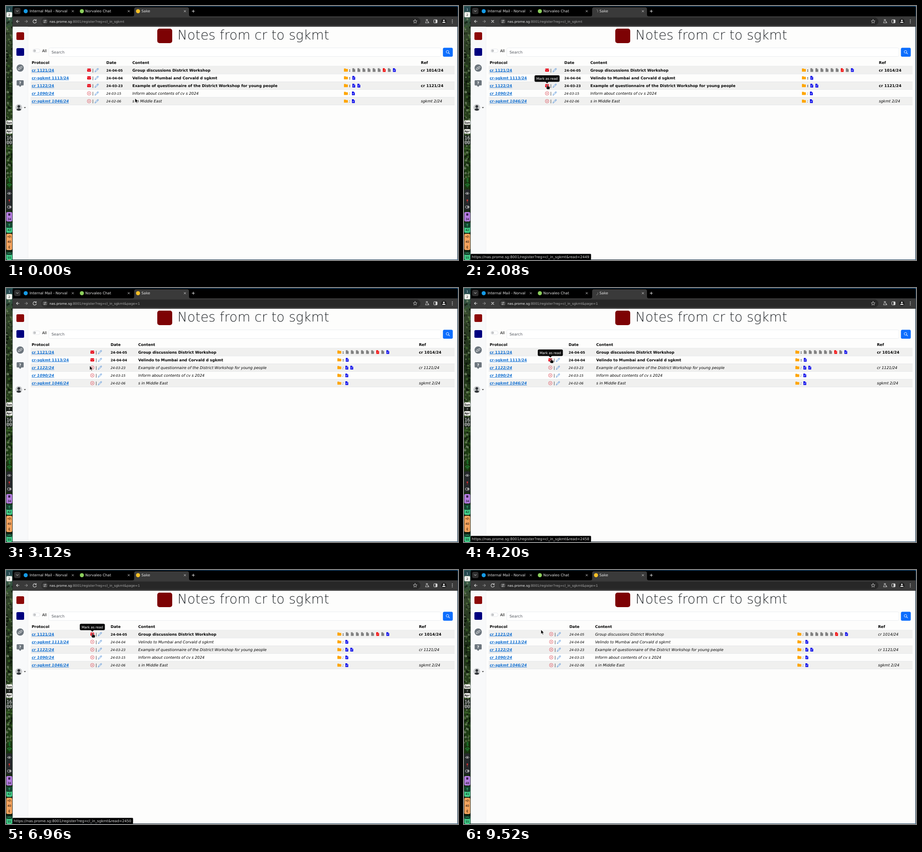
Write an HTML page that moves like this. It is 998x561 px and loops after 9.56 s.

```html
<!DOCTYPE html>
<html lang="en">
<head>
<meta charset="utf-8">
<title>Register</title>
<style>
  html, body { margin: 0; width: 100%; height: 100%; overflow: hidden; background: #000; }
  svg { display: block; width: 100%; height: 100%; }
  text { font-family: "DejaVu Sans", sans-serif; font-size: 8.32px; text-rendering: geometricPrecision; white-space: pre; }
  .b { font-weight: 700; }
  .i { font-style: italic; }
  .link { font-weight: 700; fill: #1471d2; text-decoration: underline; }
  .date { font-size: 7.28px; }
  .tab { font-size: 8px; fill: #e6e6e6; }
  .url { font-size: 7.28px; fill: #a8a8a8; }
  .bar { font-size: 6.4px; text-anchor: middle; }
  .mono { font-family: "DejaVu Sans Mono", monospace; }
  .clock { font-size: 10.5px; fill: #fff; }
</style>
</head>
<body>
<svg viewBox="0 0 998 561" preserveAspectRatio="none">
  <defs>
    <linearGradient id="forest" x1="0" y1="0" x2="0" y2="1">
      <stop offset="0" stop-color="#35635c"/><stop offset=".1" stop-color="#33452a"/>
      <stop offset=".3" stop-color="#1b2d16"/><stop offset=".45" stop-color="#28401c"/>
      <stop offset=".65" stop-color="#1c3a12"/><stop offset="1" stop-color="#0c170b"/>
    </linearGradient>
    <linearGradient id="sky">
      <stop offset="0" stop-color="#1d4a52"/><stop offset=".3" stop-color="#12304a"/>
      <stop offset=".5" stop-color="#1a5a92"/><stop offset="1" stop-color="#1d64a0"/>
    </linearGradient>
    <clipPath id="strip"><rect width="14.5" height="561"/></clipPath>
  </defs>
  <g id="backdrop"></g>
  <g id="live"></g>
</svg>
<script>
const LOOP = 9560;
const $ = id => document.getElementById(id);
const clamp = v => Math.max(0, Math.min(1, v));

const rect = (x, y, w, h, fill, r = 0, more = '') =>
  `<rect x="${x}" y="${y}" width="${w}" height="${h}" rx="${r}" fill="${fill}" ${more}/>`;
const circle = (x, y, r, fill, more = '') => `<circle cx="${x}" cy="${y}" r="${r}" fill="${fill}" ${more}/>`;
const fillPath = (d, fill) => `<path d="${d}" fill="${fill}"/>`;
const line = (d, color, width = 1) =>
  `<path d="${d}" fill="none" stroke="${color}" stroke-width="${width}" stroke-linecap="round" stroke-linejoin="round"/>`;
const text = (x, y, str, cls = '', more = '') =>
  `<text x="${x}" y="${y}" class="${cls}" ${more}>${str.replace(/&/g, '&amp;')}</text>`;
const at = (x, y, body) => `<g transform="translate(${x} ${y})">${body}</g>`;
const cross = (x, y, r, color, width) =>
  line(`M${x - r} ${y - r}l${2 * r} ${2 * r}m0 ${-2 * r}l${-2 * r} ${2 * r}`, color, width);

// Icons, centred on the origin
const icon = {
  unread: rect(-4.2, -3.3, 8.4, 6.8, '#e60012', 1) + line('M-4-1.8L0 1L4-1.8', '#fff', .7),
  read: circle(0, 0, 4, 'none', 'stroke="#d9303e" stroke-width=".7"') + cross(0, 0, 1.5, '#d9303e', .7),
  pencil: line('M-3.8 3.9L-3 1.3L2-3.7Q2.8-4.2 3.5-3.4Q4.2-2.7 3.6-2L-1.3 3ZM1-2.7L2.6-1.1', '#2a78d4', .75),
  folder: fillPath('M-4.3 3.4V-2.8Q-4.3-3.5-3.6-3.5H-.8L.2-2.5H3.6Q4.3-2.5 4.3-1.8V2.7Q4.3 3.4 3.6 3.4Z', '#ffa500'),
  file: fill => fillPath('M-3.1-4.1H.9L3.1-1.9V4.1H-3.1Z', fill) + fillPath('M.9-4.1V-1.9H3.1Z', '#fff'),
};
icon.gray = icon.file('#808080');
icon.pdf = icon.file('#f00000') + line('M-1.6 2.4Q.2.8 0-1Q.4 1 1.8 1.4', '#fff', .6);
icon.doc = icon.file('#0000e8') + line('M-1.5-.1H1.5M-1.5 1.5H1', '#fff', .7);

const rows = [
  { name: 'cr 1121/24', date: '24-04-05', content: 'Group discussions District Workshop',
    files: ['gray', 'gray', 'gray', 'gray', 'gray', 'gray', 'pdf', 'gray', 'doc'], ref: 'cr 1014/24' },
  { name: 'cr-sgkmt 1113/24', date: '24-04-04', content: 'Velindo to Mumbai and Corvald d sgkmt', files: ['doc'] },
  { name: 'cr 1122/24', date: '24-03-23', content: 'Example of questionnaire of the District Workshop for young people',
    files: ['doc', 'doc'], ref: 'cr 1121/24' },
  { name: 'cr 1090/24', date: '24-03-15', content: 'Inform about contents of cv s 2024', files: ['doc'] },
  { name: 'cr-sgkmt 1046/24', date: '24-02-06', content: 's in Middle East', files: ['doc'], ref: 'sgkmt 2/24' },
];

// Column positions after each page load
const layouts = [
  { mail: 183.4, date: 221.5, content: 279, folder: 750.5, ref: 916 },
  { mail: 190.6, date: 231, content: 292, folder: 736, ref: 911.7 },
  { mail: 190.6, date: 231, content: 292, folder: 736, ref: 911.7 },
  { mail: 192.6, date: 232.7, content: 289.4, folder: 740.5, ref: 914.2 },
];

// Each visit: hover over a row's mail icon, click, reload, move on
const visits = [
  { row: 2, id: 2449, hover: 1100, load: 1700, swap: 2280, leave: 3080 },
  { row: 1, id: 2458, hover: 3600, load: 3920, swap: 4560, leave: 6180 },
  { row: 0, id: 2450, hover: 6740, load: 7760, swap: 8800, leave: 9020 },
];

const pointerPath = [
  [0, 285, 204], [250, 285, 204], [1100, 184, 174], [3000, 184, 174], [3580, 192, 156],
  [6100, 192, 156], [6720, 191, 139.5], [8920, 191, 139.5], [9440, 170, 132], [LOOP, 170, 132],
];

function pointerAt(t) {
  const k = pointerPath.findIndex(p => p[0] > t);
  const [t0, x0, y0] = pointerPath[k - 1], [t1, x1, y1] = pointerPath[k];
  const u = (t - t0) / (t1 - t0), e = u * u * (3 - 2 * u);
  return [x0 + (x1 - x0) * e, y0 + (y1 - y0) * e];
}

const rowMid = i => 141.5 + 17.17 * i;

function drawRow(row, i, col, unread) {
  const mid = rowMid(i), base = mid + 3;
  const style = unread ? 'b' : 'i';
  const gap = unread ? 11.2 : 10.95, first = col.folder + (unread ? 17.4 : 16.5);
  return text(56.7, base, row.name, unread ? 'link' : 'link i') +
    at(col.mail, mid, unread ? icon.unread : icon.read) +
    text(col.mail + 7.2, base, '|') +
    at(col.mail + 16.9, mid, icon.pencil) +
    text(col.date, base, row.date, 'date ' + style) +
    text(col.content, base, row.content, style) +
    at(col.folder, mid, icon.folder) +
    text(col.folder + 6.7, base, ':', style) +
    row.files.map((f, n) => at(first + gap * n, mid, icon[f])).join('') +
    text(col.ref, base, row.ref || '', style);
}

function drawTable(col, readRows) {
  return text(56.7, 127.5, 'Protocol', 'b') + text(col.date, 127.5, 'Date', 'b') +
    text(col.content, 127.5, 'Content', 'b') + text(col.ref, 127.5, 'Ref', 'b') +
    rows.map((row, i) => drawRow(row, i, col, i < 3 && !readRows.includes(i))).join('');
}

function drawTabState(loading, t) {
  if (!loading) {
    return circle(291.5, 11.5, 4.5, '#f5c026') +
      line('M66 31.4A3.7 3.7 0 1 0 67 34.8M66.8 29.7V32.2H64.3', '#ddd', 1.1);
  }
  return at(291.5, 11.5, `<g transform="rotate(${t * .36})">${line('M0-4A4 4 0 0 1 4 0', '#8f8f8f', 1)}</g>`) +
    cross(63.3, 34, 2.5, '#ddd', 1.1);
}

function drawTooltip(x, mid, opacity) {
  return `<g opacity="${opacity}">` + rect(x - 27.7, mid - 22.8, 55.4, 14.4, '#0b0b0b', 3) +
    fillPath(`M${x - 3.5} ${mid - 8.6}h7l-3.5 3.4z`, '#0b0b0b') +
    text(x, mid - 13, 'Mark as read', 'date', 'fill="#fff" text-anchor="middle"') + '</g>';
}

function drawStatus(id, opacity) {
  return `<g opacity="${opacity}">` + rect(14.5, 547.5, 266, 13, '#000', 1.5) +
    text(17, 557, `https://nas.prome.sg:8001/register?reg=cl_in_sgkmt&read=${id}`, '', 'fill="#ddd" style="font-size:7.95px"') + '</g>';
}

const arrow = '<path d="M0 0V9.2L2.2 7.3L3.8 10.6L5.3 9.9L3.8 6.7H6.7Z" fill="#000" stroke="#fff" stroke-width=".6"/>';
const hand = '<path d="M-.9 0Q0-.9.9 0V3.3L4.9 4.2Q5.9 4.5 5.8 5.7L5 10H-.3L-3 6.4Q-3.1 5.2-2 5.4L-.9 6.3Z" fill="#000" stroke="#fff" stroke-width=".5"/>';

function drawLive(t) {
  const done = visits.filter(v => t >= v.swap);
  const col = layouts[done.length];
  const loading = visits.some(v => t >= v.load && t < v.swap);
  const hovering = visits.some(v => t >= v.hover && t < v.leave);
  let out = drawTabState(loading, t) +
    `<text x="96" y="36.7" class="url"><tspan fill="#eee">nas.prome.sg</tspan>:8001/register?reg=cl_in_sgkmt${done.length ? '&amp;page=1' : ''}</text>` +
    drawTable(col, done.map(v => v.row));
  const [high, low] = t < 8700 ? [34, 42] : [48, 41];
  out += text(7.3, 473, '' + high, 'bar') + text(7.3, 497, '' + low, 'bar');
  for (const v of visits) {
    if (t >= v.hover && t < v.swap) out += drawTooltip(col.mail, rowMid(v.row), clamp((t - v.hover) / 120));
    const shown = clamp((t - v.hover) / 200) * (1 - clamp((t - v.swap - 120) / 240));
    if (shown) out += drawStatus(v.id, shown);
  }
  return out + at(...pointerAt(t), hovering ? hand : arrow);
}

function drawWallpaper() {
  let seed = 7, leaves = rect(0, 0, 14.5, 561, 'url(#forest)');
  const rand = () => (seed = seed * 16807 % 2147483647) / 2147483647;
  const greens = ['#5d7a48', '#070e06', '#3f6a2c', '#101c0b', '#7d9070'];
  for (let i = 0; i < 260; i++) {
    leaves += circle(rand() * 15, 28 + rand() * 355, .7 + rand() * 2, greens[i % 5], 'opacity=".65"');
  }
  return rect(0, 0, 998, 561, 'url(#sky)') + `<g clip-path="url(#strip)">${leaves}</g>`;
}

function drawDesktopBar() {
  const pill = (y, h, fill) => rect(.7, y, 13, h, fill, 3);
  return rect(1, 1, 12.5, 11.5, '#24464d', 2) + text(7.3, 9.5, '1', 'bar mono', 'fill="#d5e5e8"') +
    rect(1, 13.5, 12.5, 11.5, '#f5f5f0', 2) + text(7.3, 22, '2', 'bar mono') +
    rect(.5, 252.5, 13.5, 10, '#f4f4ef', 2) + text(7.3, 259.8, 'Sun', 'bar mono b') +
    rect(.5, 262.5, 13.5, 9.5, '#1c211c', 2) + text(7.3, 269.8, '7', 'bar mono', 'fill="#fff"') +
    rect(.5, 272, 13.5, 10, '#f4f4ef', 2) + text(7.3, 279.3, 'Apr', 'bar mono b') +
    rect(.5, 285, 13.5, 22, '#182119', 2) +
    text(7.3, 295.3, '16', 'bar mono clock') + text(7.3, 304.6, '00', 'bar mono clock') +
    line('M7.5 380V389M5 382L10 387L7.5 389.5V379.5L10 382L5 387', '#1b8c36', .9) +
    line('M3 395Q7.5 390.5 12 395M5 397.3Q7.5 395 10 397.3', '#24b648', 1.1) + circle(7.5, 399.3, .9, '#24b648') +
    pill(405, 46, '#25282b') + line('M3 414Q7.3 409 11.6 414Q7.3 418 3 414', '#ddd', .8) + circle(7.3, 414, 1.2, '#ddd') +
    circle(7.3, 429, 1.7, '#df3030') + line('M7.3 431V434', '#df3030', .8) +
    rect(3, 441.5, 8.6, 5, 'none', 2.5, 'stroke="#eee" stroke-width=".8"') + circle(9, 444, 1.4, '#eee') +
    pill(455, 21, '#b47cdf') + rect(5, 458, 4.5, 5, '#38204c', 1) +
    pill(478, 23, '#43d08c') + pill(478, 12, '#14442f') + line('M7.3 481V487M5.5 483H9', '#43d08c', .8) +
    pill(503, 36, '#f4a35e') + line('M4 509H6L8.5 507V512L6 510H4ZM10 508L11.5 511', '#54330f', .8) +
    text(7.3, 523.3, '40', 'bar') + line('M5 531L9 535M7.3 529V536M9 531L5 534', '#54330f', .8) +
    pill(543, 18, '#43d08c') + pill(543, 7, '#14442f') + line('M4 547Q7.3 544 10.5 547', '#43d08c', .8) +
    text(7.3, 557.5, '55', 'bar');
}

function drawBrowser() {
  const light = '#dcdcdc';
  return rect(14.5, 1, 983, 559.5, '#000', 2) +
    rect(18, 4, 14, 14, '#2e2e2e', 4) + line('M22.7 10L25 12.4L27.3 10', light, 1) +
    fillPath('M279 23Q283 23 283 19V7Q283 3 287 3H400Q404 3 404 7V19Q404 23 408 23Z', '#3a3a3a') +
    rect(14.5, 22.8, 983, 23, '#3a3a3a') +
    circle(43.5, 11.5, 4.5, '#159be6') + circle(167.5, 11.5, 4.5, '#8ccf5c') +
    text(52, 14.2, 'Internal Mail - Norval', 'tab') + text(175, 14.2, 'Norvaleo Chat', 'tab') + text(299, 14.2, 'Sake', 'tab') +
    [147.5, 271, 395].map(x => cross(x, 11.5, 1.8, light, .9)).join('') +
    line('M413.5 8.8V14.2M410.8 11.5H416.2', light, 1.1) +
    line('M29 34H23.2M25.7 31.3L23 34L25.7 36.7', light, 1.1) + line('M41.5 34H47.3M44.8 31.3L47.5 34L44.8 36.7', '#8a8a8a', 1.1) +
    rect(78, 25.5, 837, 17, '#272727', 8.5) + circle(86, 34, 6.5, '#3a3a3a') +
    line('M83 32.2H85.4M88 32.2H89.2M83 35.8H84M87 35.8H89.2', light, .9) +
    circle(86.8, 32.2, 1, 'none', `stroke="${light}" stroke-width=".8"`) + circle(85.2, 35.8, 1, 'none', `stroke="${light}" stroke-width=".8"`) +
    line('M903.3 29.8L904.5 32.6L907.5 32.9L905.2 34.9L905.9 37.9L903.3 36.3L900.7 37.9L901.4 34.9L899.1 32.9L902.1 32.6Z', light, .8) +
    line('M927.5 30.2H931M928.2 30.2V33L926 37.2H933L930.5 33V30.2M932 34L934 37.2', light, .9) +
    rect(944.5, 30.3, 7.5, 7, 'none', 1, `stroke="${light}" stroke-width="1"`) + rect(948.5, 30.3, 3.5, 7, light) +
    circle(966.8, 34, 6, '#1f1f1f') + circle(966.8, 32, 1.8, '#f0f0f0') + fillPath('M963.2 37.3Q963.2 34.7 966.8 34.7T970.4 37.3Z', '#f0f0f0') +
    [30.7, 34, 37.3].map(y => circle(985.5, y, .9, light)).join('');
}

function drawPage() {
  const gray = '#6c757d';
  let out = rect(14.8, 45.8, 982, 514.2, '#fdfdfc') + rect(14.8, 45.8, 33.2, 514.2, '#f8f9fa') +
    rect(48, 45.8, .5, 514.2, '#e4e6ea') + rect(22, 48.3, 20, .5, '#e0e3e8') +
    rect(23, 58, 17, 17, '#8c0808', 2.5) + rect(23, 93, 17, 17, '#00007f', 2.5) +
    circle(31.3, 137, 8, gray) + line('M31 138.7L29.2 140.4Q27.8 141.2 27 140Q26.4 138.7 27.5 137.8L29.8 135.6Q31.3 134.7 32.3 136M31.5 135.4L33.3 133.7Q34.7 132.9 35.5 134.1Q36.1 135.4 35 136.3L32.7 138.5Q31.2 139.4 30.2 138', '#fff', 1) +
    fillPath('M25 164H37.5Q39 164 39 165.5V174Q39 175.5 37.5 175.5H34L31.2 179L28.5 175.5H25Q23.5 175.5 23.5 174V165.5Q23.5 164 25 164Z', gray) +
    text(31.2, 173, '?', 'b', 'fill="#fff" text-anchor="middle"') +
    circle(28.3, 224.3, 7.5, '#c9cbcd') + circle(28.3, 222, 3, '#33373b') + fillPath('M22.9 229.2Q28.3 222.5 33.7 229.2Q28.3 233.5 22.9 229.2Z', '#33373b') +
    fillPath('M39.4 223.4H44L41.7 225.8Z', '#222') +
    rect(334, 50, 33, 32, '#7d0204', 5) +
    text(378.5, 74.2, 'Notes from cr to sgkmt', '', 'fill="#212529" style="font-size:29.1px;font-weight:200"') +
    rect(59, 94.8, 16, 8, '#fff', 4, 'stroke="#d5d9dd" stroke-width=".6"') + circle(63.2, 98.8, 2.9, '#c4c6c8') +
    text(79.7, 101.6, 'All') +
    rect(94.5, 92.5, 866, 19, '#fff', 3, 'stroke="#dee2e6" stroke-width=".6"') + text(100.6, 105, 'Search', '', 'fill="#555a60"') +
    rect(964.7, 92.3, 21.8, 19.6, '#0d6efd', 3) + circle(974.8, 101.2, 2.9, 'none', 'stroke="#fff" stroke-width=".9"') +
    line('M977 103.4L979.3 105.7', '#fff', 1.1);
  rows.forEach((_, i) => {
    const top = rowMid(i) - 8.58;
    if (i % 2 === 0) out += rect(54.5, top, 936, 17.17, '#f0f0ef');
    out += rect(54.5, top - .3, 936, .6, '#dcdfe3');
  });
  return out + rect(54.5, rowMid(4) + 8.3, 936, .6, '#dcdfe3');
}

$('backdrop').innerHTML = drawWallpaper() + drawDesktopBar() + drawBrowser() + drawPage();

const start = performance.now();
function tick() {
  $('live').innerHTML = drawLive((performance.now() - start) % LOOP);
  requestAnimationFrame(tick);
}
tick();
</script>
</body>
</html>
```
